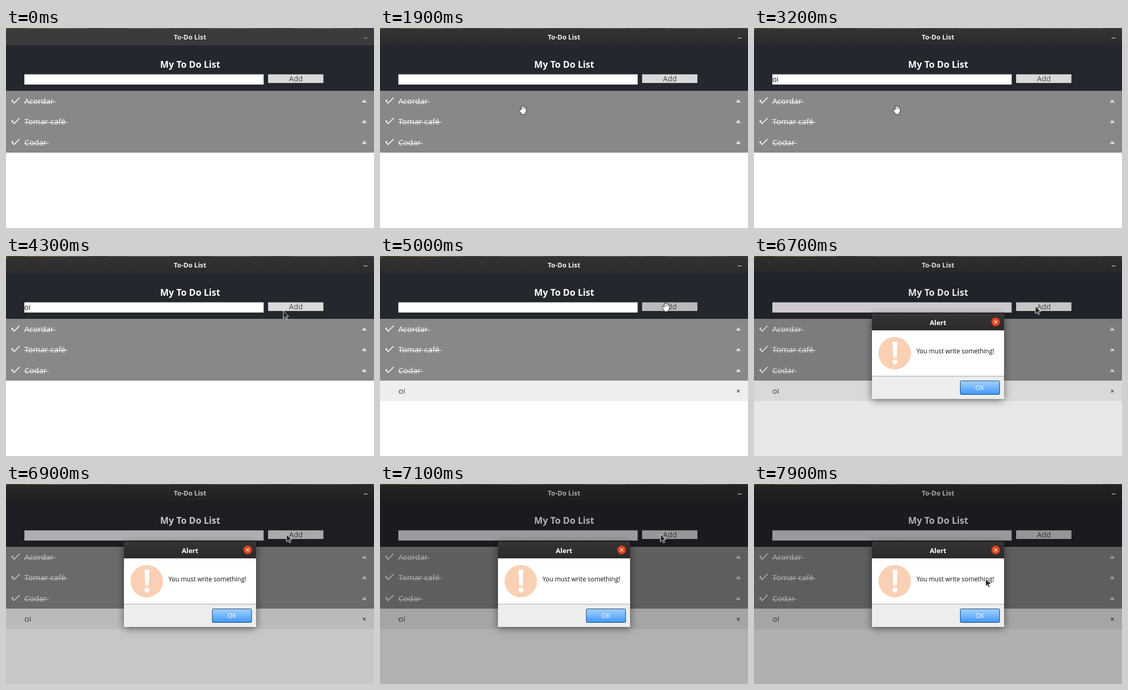
Write an HTML page with a canvas that moves like this. It is 702x382 px and loops after 8000 ms.

```html
<!DOCTYPE html>
<html lang="en">
<head>
<meta charset="utf-8">
<title>To-Do List</title>
<style>
  html, body { margin: 0; width: 100%; height: 100%; overflow: hidden; background: #fff; }
  canvas { display: block; }
</style>
</head>
<body>
<canvas id="stage" width="702" height="382"></canvas>
<script>
const ctx = document.getElementById('stage').getContext('2d');
const W = 702, H = 382, LOOP = 8000, STEP = 100, ROW = 39.33, LIST_TOP = 120;
const FAMILY = '"Open Sans", "Noto Sans", sans-serif';
const FOCUS = 1400, TYPE = 2600, BLUR = 4500, ADDED = 4900, ALERT = 6500;

// Each move starts where the previous one ended; a bulge bends its path.
const START = { x: 556, y: 1 };
const MOVES = [
  { from: 100, to: 500, x: 54, y: 175 },
  { from: 700, to: 1200, x: 84, y: 96, bulgeX: 460, bulgeY: -120 },
  { from: 1500, to: 1700, x: 272, y: 156 },
  { from: 3600, to: 4300, x: 529, y: 105 },
  { from: 4300, to: 4500, x: 545, y: 97 },
  { from: 5400, to: 6000, x: 540, y: 95 },
  { from: 6400, to: 6900, x: 535, y: 96 },
  { from: 7300, to: 7900, x: 442, y: 181 }
];

const HAND = new Path2D('M-3 9V6.5L-7 1Q-7.5-1-5.5-1L-3 1V-6Q-2-8-.7-6V-7Q.7-9 2-7V-6Q3.3-8 4.5-6V-4Q6.2-6 7-4V3L5 7V9Z');
const KNUCKLES = new Path2D('M-.7-6V-1M2-6V-1M4.5-4V-1');
const ARROW = new Path2D('M0 0V14.5L3.3 11.4L5.7 16.5L8 15.4L5.7 10.5H10.2Z');
const IBEAM = new Path2D('M-3-8H-1L0-7L1-8H3M0-7V7M-3 8H-1L0 7L1 8H3');
const CHECK = new Path2D('M10.5 138.5L15.5 143.5L26 133M10.5 139L14 137.5');

function smooth(t, from, to) {
  const p = Math.min(1, Math.max(0, (t - from) / (to - from)));
  return p * p * (3 - 2 * p);
}

function pointerAt(t) {
  let { x, y } = START;
  for (const { from, to, x: endX, y: endY, bulgeX = 0, bulgeY = 0 } of MOVES) {
    const p = smooth(t, from, to), bend = Math.sin(Math.PI * p);
    x += (endX - x) * p + bulgeX * bend;
    y += (endY - y) * p + bulgeY * bend;
  }
  return { x, y };
}

function rect(x, y, w, h, fill) {
  ctx.fillStyle = fill;
  ctx.fillRect(x, y, w, h);
}

function text(str, x, y, size, color, weight = 500, align = 'left') {
  ctx.font = `${weight} ${size}px ${FAMILY}`;
  ctx.fillStyle = color;
  ctx.textAlign = align;
  ctx.fillText(str, x, y);
}

function stroke(path, color, width) {
  ctx.strokeStyle = color;
  ctx.lineWidth = width;
  ctx.stroke(path);
}

function cross(x, y, r, color, width) {
  stroke(new Path2D(`M${x - r} ${y - r}L${x + r} ${y + r}M${x + r} ${y - r}L${x - r} ${y + r}`), color, width);
}

function disc(x, y, r, fill) {
  ctx.fillStyle = fill;
  ctx.beginPath();
  ctx.arc(x, y, r, 0, 7);
  ctx.fill();
}

function vertical(y0, y1, ...colors) {
  const g = ctx.createLinearGradient(0, y0, 0, y1);
  colors.forEach((c, i) => g.addColorStop(i / (colors.length - 1), c));
  return g;
}

function panel(x, y, w, h, radii, fill) {
  ctx.beginPath();
  ctx.roundRect(x, y, w, h, radii);
  ctx.fillStyle = fill;
  ctx.fill();
}

// Sliver of desktop above the window: green on the left, grey further right.
function drawDesktop() {
  const count = 18;
  for (let i = 0; i < count; i++) {
    const light = 25 + 20 * Math.abs(Math.sin(i * 2.4));
    rect(i * W / count, 0, W / count + 1, 8, `hsl(85 ${Math.max(6, 50 - i * 12)}% ${light}%)`);
  }
}

function drawWindow(focused) {
  rect(0, 0, W, H, '#fff');
  drawDesktop();
  rect(0, 32, W, 88, '#24272e');
  panel(0, 1, W, focused ? 31 : 32, [6, 6, 0, 0],
    focused ? vertical(1, 32, '#353233', '#2c2a2a') : '#3c3a3a');
  text('To-Do List', 351, 22, 12.7, focused ? '#f4f3f2' : '#e8e7e6', 700, 'center');
  text('My To Do List', 351.3, 76, 17.4, '#fff', 700, 'center');
}

function drawForm(t) {
  rect(35, 88.5, 456.5, 19.5, t < ALERT ? '#fff' : '#e2dde3');
  const typed = t < TYPE || t >= ADDED ? '' : 'oi'.slice(0, t < TYPE + 200 ? 1 : 2);
  text(typed, 35, 102.5, 13.6, '#111');
  const sinceBlink = t - (t < TYPE ? FOCUS : TYPE + 100);
  if (t >= FOCUS && t < BLUR && sinceBlink % 1000 < 500) {
    rect(35 + Math.round(ctx.measureText(typed).width), 89, 1, 18, '#111');
  }

  const hover = smooth(t, 4400, 4700) - smooth(t, 6400, 6700);
  const shade = Math.round(217 - 31 * hover);
  rect(500, 88.5, 105.5, 16.5, `rgb(${shade},${shade},${shade + 1})`);
  text('Add', 553, 101.7, 14.2, '#4c4c4c', 500, 'center');
}

function drawItem(label, index, done) {
  const offset = Math.round(index * ROW), next = Math.round((index + 1) * ROW);
  ctx.save();
  ctx.translate(0, offset);
  rect(0, LIST_TOP, W, next - offset, done ? '#888' : '#eee');
  text(label, 35, 145, 15.2, done ? '#fff' : '#484848');
  cross(683.5, 140, 2.5, done ? '#fff' : '#4a4a66', 1.2);
  if (done) {
    rect(35, 141, ctx.measureText(label + ' ').width, 1, '#fff');
    rect(679, 141, 9, 1, '#fff');
    stroke(CHECK, '#fff', 1.7);
  }
  ctx.restore();
}

function drawAlert() {
  ctx.save();
  ctx.shadowColor = 'rgba(0,0,0,.5)';
  ctx.shadowBlur = 15;
  ctx.shadowOffsetY = 3;
  panel(225, 110, 252, 163, [7, 7, 0, 0], '#fff');
  ctx.restore();
  panel(225, 110, 252, 32, [7, 7, 0, 0], vertical(110, 142, '#373334', '#2b2929'));
  text('Alert', 351, 131.5, 12.8, '#fff', 700, 'center');
  disc(461, 126, 8.2, '#e2451f');
  cross(461, 126, 2.9, '#fff', 1.3);

  disc(268.5, 185.7, 31, '#f9d0b4');
  ctx.fillStyle = '#fff';
  ctx.fill(new Path2D('M264.3 163.5H273.7L272.3 194H265.7Z'));
  disc(269, 202.5, 4.8, '#fff');
  text('You must write something!', 310, 186, 11.9, '#111');

  rect(225, 229, 252, 44, '#eceeed');
  rect(225, 229, 252, 1, '#a2a3a2');
  panel(393.5, 238.5, 75, 26, 2, vertical(239, 264, '#a2cffc', '#75b5fa', '#3f98f8'));
  ctx.strokeStyle = '#173f70';
  ctx.lineWidth = 1;
  ctx.stroke();
  text('OK', 430.8, 256, 12.2, '#fff', 500, 'center');
}

function drawPointer(t) {
  if (t < STEP) return;
  const { x, y } = pointerAt(t);
  const overInput = x > 35 && x < 491 && y > 88 && y < 108;
  const overAdd = x > 500 && x < 605 && y > 88 && y < 105;
  ctx.save();
  ctx.translate(x, y);
  ctx.lineJoin = 'round';
  if (t < ALERT && overInput) {
    stroke(IBEAM, '#fff', 3);
    stroke(IBEAM, '#222', 1.2);
  } else if (t < ALERT && (overAdd || y > LIST_TOP)) {
    ctx.fillStyle = '#fff';
    ctx.fill(HAND);
    stroke(HAND, '#222', 1);
    stroke(KNUCKLES, '#444', .8);
  } else {
    ctx.fillStyle = '#222';
    ctx.fill(ARROW);
    stroke(ARROW, '#eee', 1);
  }
  ctx.restore();
}

function draw(t) {
  const focused = t >= FOCUS;
  drawWindow(focused);
  drawForm(t);
  ['Acordar', 'Tomar café', 'Codar'].forEach((label, i) => drawItem(label, i, true));
  if (t >= ADDED) drawItem('oi', 3, false);
  rect(0, 1, W, H, `rgba(0,0,0,${.31 * smooth(t, 6450, 7150)})`);
  rect(682.5, 18.5, 7, 1.2, focused ? '#dedddc' : '#aaa8a7');
  if (t >= ALERT) {
    ctx.globalAlpha = smooth(t, ALERT - STEP, ALERT + STEP);
    drawAlert();
    ctx.globalAlpha = 1;
  }
  drawPointer(t);
}

function frame() {
  const t = performance.now() % LOOP;
  draw(Math.floor(t / STEP) * STEP);
  requestAnimationFrame(frame);
}
frame();
</script>
</body>
</html>
```
